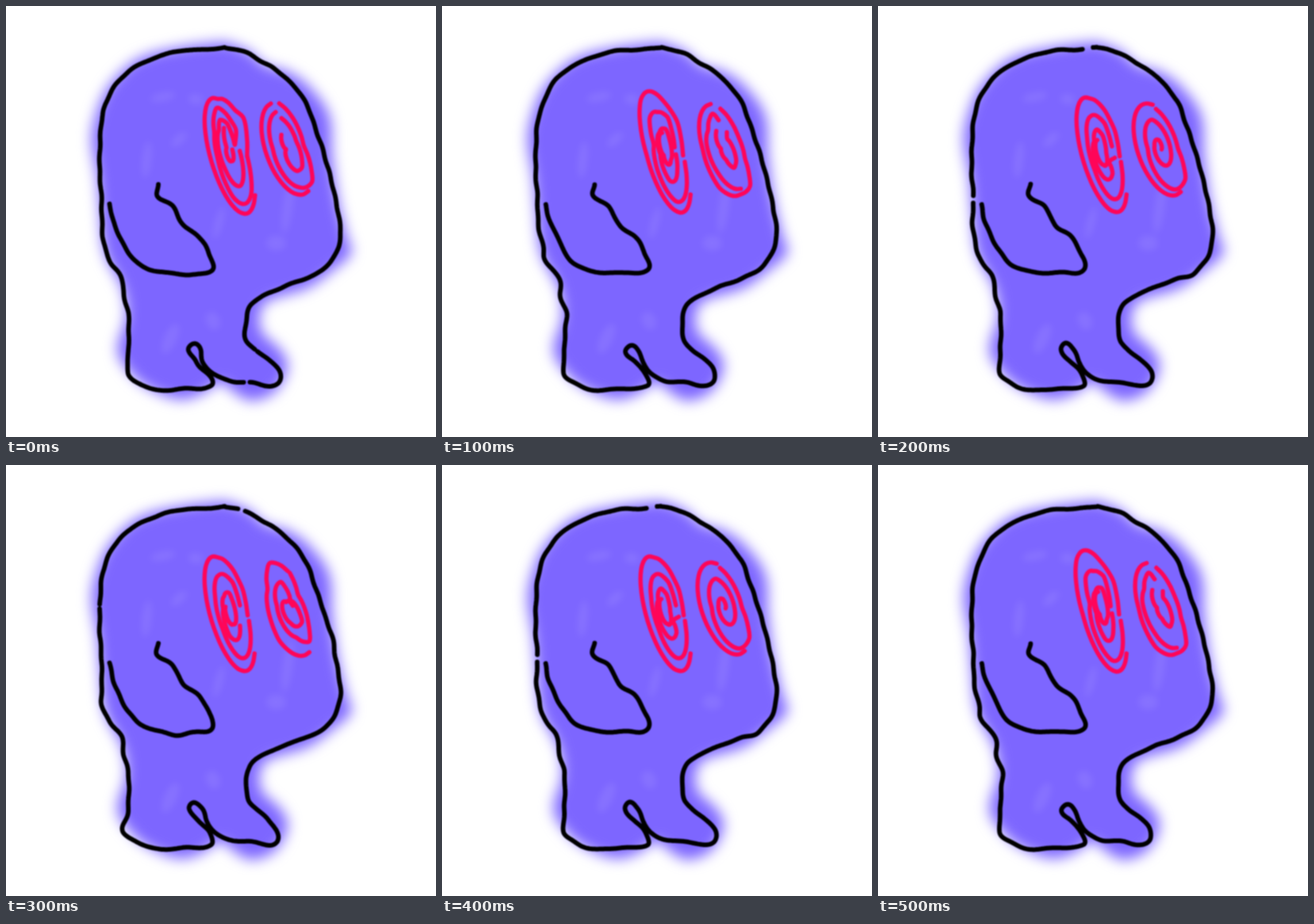
These frames come from a looping animation (748x749 px, 0.6 s). An HTML page:

```html
<!DOCTYPE html>
<html lang="en">
<head>
<meta charset="utf-8">
<title>Dizzy blob</title>
<style>
  html, body { margin: 0; width: 100%; height: 100%; overflow: hidden; background: #fff; }
  svg { display: block; width: 100%; height: 100%; }
  #poses path { fill: none; stroke-linecap: round; stroke-linejoin: round; }
  .line { stroke: #000; stroke-width: 8; }
  .eye { stroke: #ff0558; stroke-width: 7.4; }
</style>
</head>
<body>
<svg viewBox="0 0 748 749" preserveAspectRatio="none">
  <defs>
    <filter id="glow" x="-20%" y="-20%" width="140%" height="140%" color-interpolation-filters="sRGB"><feGaussianBlur stdDeviation="11.5"/></filter>
    <filter id="haze" x="-20%" y="-20%" width="140%" height="140%" color-interpolation-filters="sRGB"><feGaussianBlur stdDeviation="6"/></filter>
    <filter id="soft" color-interpolation-filters="sRGB"><feGaussianBlur stdDeviation="1.1"/></filter>
  </defs>
  <path id="body" fill="#7d66ff" filter="url(#glow)"/>
  <g id="shine" fill="#fff" fill-opacity=".08" filter="url(#haze)"></g>
  <g id="poses" filter="url(#soft)"></g>
</svg>
<script>
const STEP = 100;
const ORDER = [0, 1, 2, 3, 2, 1];

const BODY = "380,62 300,72 230,92 180,138 158,185 149,232 159,300 163,350 172,430 202,490 209,540 194,600 220,642 255,668 305,684 345,672 372,655 405,677 430,686 470,668 490,625 475,595 446,568 441,540 452,515 525,490 570,458 601,428 594,405 578,340 567,260 562,190 525,138 488,113 452,103 422,78 380,62";
const OUTLINE = "380,72 345,76 310,77 277,84 238,99 208,118 186,144 174,168 167,195 164,230 163,290 166,330 167,375 170,415 180,445 201,472 205,505 213,535 213,600 212,638 225,652 260,667 310,665 357,660 355,640 335,618 318,598 327,586 341,597 350,620 365,640 390,652 425,654 457,660 473,652 473,632 457,614 435,598 421,580 418,550 424,522 440,508 480,489 520,474 550,459 572,433 582,400 576,350 565,300 551,250 538,212 520,165 490,128 465,108 447,98 425,84 405,77 380,72";
const EAR = "265,310 263,330 290,348 309,382 335,400 353,430 358,459 320,463 275,463 236,452 214,430 200,406 188,378 180,344";

// x, y, rx, ry, tilt
const SHINE = [
  [273, 158, 22, 8, -12], [330, 162, 13, 9, 10], [301, 232, 17, 8, -42],
  [245, 267, 8, 32, 6], [470, 412, 17, 13, 0], [490, 350, 9, 45, 8],
  [370, 377, 7, 28, 15], [286, 578, 11, 28, 25], [360, 547, 12, 16, -25]
];

// Slanted ellipses: centre, long-axis vector, half width.
const LEFT = { x: 388, y: 258, dx: 26, dy: 100, w: 34 };
const RIGHT = { x: 490, y: 248, dx: 22, dy: 80, w: 40 };

const RING = "88:.93 112:1.1 134:1.09 170:.99 270:1 360:1 408:1.04";
const MID = "102:.68 131:.8 180:.67 240:.57 297:.6 355:.76 442:.93";

// Spirals are "angle:size" stops, pulls are x, y, dx, dy, gaps are x, y, radius.
const POSES = [
  {
    pulls: [[350, 620, -8, 0], [473, 632, 4, 4], [421, 580, -4, 0], [176, 437, 2, 0], [320, 463, 0, 4]],
    gaps: [[419, 654, 5], [437, 596, 4]],
    left: [
      "88:.9 117:1.38 131:1.18 170:.98 270:1 360:1.03 408:1.06",
      "112:.48 122:.8 180:.81 231:.6 276:.64 334:.82 403:.92 448:.91",
      "96:.6 17:.57 -55:.47 -155:.47 -179:.6 -211:.62 -248:.45",
      "169:.47 200:.12 380:.12 470:.25"
    ],
    right: [
      "191:1 383:1",
      "170:1 95:.74 44:.98 3:.84 -90:.65 -174:.8",
      "172:.67 109:.49 45:.57 15:.5 -80:.08 -160:.32"
    ]
  },
  {
    pulls: [[174, 168, 3, 0], [172, 415, 6, 4], [201, 472, 4, 2], [213, 535, 4, 0], [329, 586, 2, 4], [200, 400, 2, -3]],
    gaps: [],
    left: [
      "89:.91 118:1.2 146:1.12 208:1.08 270:.95 360:1.01 408:1.04",
      "102:.6 135:.9 166:.76 206:.7 248:.48 293:.65 358:.82 442:.92",
      "90:.56 57:.5 -11:.47 -90:.24 -180:.38 -222:.58 -295:.24 -440:.08 -560:.4"
    ],
    right: [
      "182:.97 270:.92 323:1.07 371:1.01 401:1.07 435:.84 470:.83 519:.93",
      "169:.63 184:.76 228:.61 258:.69 314:.75 377:.91",
      "196:.4 270:.12 353:.24 388:.47 417:.48 489:.35 497:.49"
    ]
  },
  {
    pulls: [[201, 472, -3, -5], [167, 375, -3, 0], [550, 459, -1, 6], [572, 433, 1, 4], [473, 632, 3, 5], [465, 108, 3, 2]],
    gaps: [[365, 74, 8], [166, 336, 6]],
    left: [RING, MID, "85:.66 70:.36 47:.47 11:.44 -73:.41 -142:.29 -196:.45 -226:.47 -265:.29 -367:.18 -540:.25"],
    right: [
      "167:.98 270:1 383:1.02",
      "160:.92 90:.8 50:1 10:.9 -90:.52 -180:.63 -270:.47 -360:.36 -470:.2 -560:.2 -640:.08"
    ]
  },
  {
    pulls: [[208, 636, -9, 0], [168, 415, -4, 0], [550, 459, 5, -2], [565, 300, 3, 0], [473, 632, -2, 6], [300, 463, -3, 6]],
    gaps: [[166, 246, 4], [410, 78, 5]],
    left: [RING, MID, "62:.45 23:.46 -35:.47 -109:.25 -175:.3 -218:.45 -277:.33 -340:.2 -500:.15"],
    right: [
      "151:.91 195:1 238:.77 286:.92 313:1.04 383:1.05",
      "146:.91 115:.67 65:.79 37:.91 2:.65 -95:.45 -181:.56 -233:.27 -303:.55 -370:.34 -540:.12 -620:.25"
    ]
  }
];

const pairs = (text, sep) => text.split(" ").map(p => p.split(sep).map(Number));

function add(parent, tag, attrs) {
  const el = document.createElementNS("http://www.w3.org/2000/svg", tag);
  for (const key in attrs) el.setAttribute(key, attrs[key]);
  return parent ? parent.appendChild(el) : el;
}

// Smooth path through every point.
function curve(pts) {
  const at = i => pts[Math.max(0, Math.min(pts.length - 1, i))];
  let d = "M" + pts[0];
  for (let i = 0; i < pts.length - 1; i++) {
    const b = at(i), c = at(i + 1);
    const len = Math.hypot(c[0] - b[0], c[1] - b[1]) / 3;
    const handle = (from, to, base, sign) => {
      const v = [to[0] - from[0], to[1] - from[1]], n = Math.hypot(...v) || 1;
      return base.map((p, k) => (p + sign * len * v[k] / n).toFixed(1));
    };
    d += "C" + handle(at(i - 1), c, b, 1) + " " + handle(b, at(i + 2), c, -1) + " " + c;
  }
  return d;
}

// Walks along a curve, shifts it by the pulls and a slight hand tremor, and leaves out the gaps.
function sketch(pts, { pulls, gaps }, seed) {
  const path = add(null, "path", { d: curve(pts) });
  const total = path.getTotalLength();
  let d = "", pen = "M";
  for (let s = 0; s <= total; s += 2) {
    const p = path.getPointAtLength(s);
    let x = p.x + 0.6 * Math.sin(s / 7 + seed), y = p.y + 0.6 * Math.sin(s / 9 + seed * 2);
    for (const [px, py, dx, dy] of pulls) {
      const near = Math.exp(-((p.x - px) ** 2 + (p.y - py) ** 2) / 450);
      x += dx * near;
      y += dy * near;
    }
    if (gaps.some(([gx, gy, r]) => Math.hypot(x - gx, y - gy) < r)) { pen = "M"; continue; }
    d += pen + x.toFixed(1) + "," + y.toFixed(1);
    pen = "L";
  }
  return d;
}

// Turns around the eye, with the size running evenly from stop to stop.
function spiral(eye, text) {
  const stops = pairs(text, ":"), pts = [];
  stops.forEach(([a1, s1], i) => {
    const [a0, s0] = stops[Math.max(0, i - 1)];
    const n = Math.max(1, Math.ceil(Math.abs(a1 - a0) / 15));
    for (let k = 1; k <= n; k++) {
      const a = (a0 + (a1 - a0) * k / n) * Math.PI / 180, s = s0 + (s1 - s0) * k / n;
      pts.push([
        eye.x + s * (eye.dx * Math.cos(a) + eye.w * Math.sin(a)),
        eye.y + s * eye.dy * Math.cos(a)
      ]);
    }
  });
  return curve(pts);
}

const byId = id => document.getElementById(id);
byId("body").setAttribute("d", curve(pairs(BODY, ",")));

for (const [cx, cy, rx, ry, tilt] of SHINE)
  add(byId("shine"), "ellipse", { cx, cy, rx, ry, transform: `rotate(${tilt} ${cx} ${cy})` });

const groups = POSES.map((pose, seed) => {
  const g = add(byId("poses"), "g", {});
  for (const shape of [OUTLINE, EAR]) add(g, "path", { class: "line", d: sketch(pairs(shape, ","), pose, seed) });
  for (const stops of pose.left) add(g, "path", { class: "eye", d: spiral(LEFT, stops) });
  for (const stops of pose.right) add(g, "path", { class: "eye", d: spiral(RIGHT, stops) });
  return g;
});

function draw(time) {
  const pose = ORDER[Math.floor(time / STEP) % ORDER.length];
  groups.forEach((g, i) => g.style.display = i === pose ? "" : "none");
}

const start = performance.now();
function tick() {
  draw(performance.now() - start);
  requestAnimationFrame(tick);
}
tick();
</script>
</body>
</html>
```
